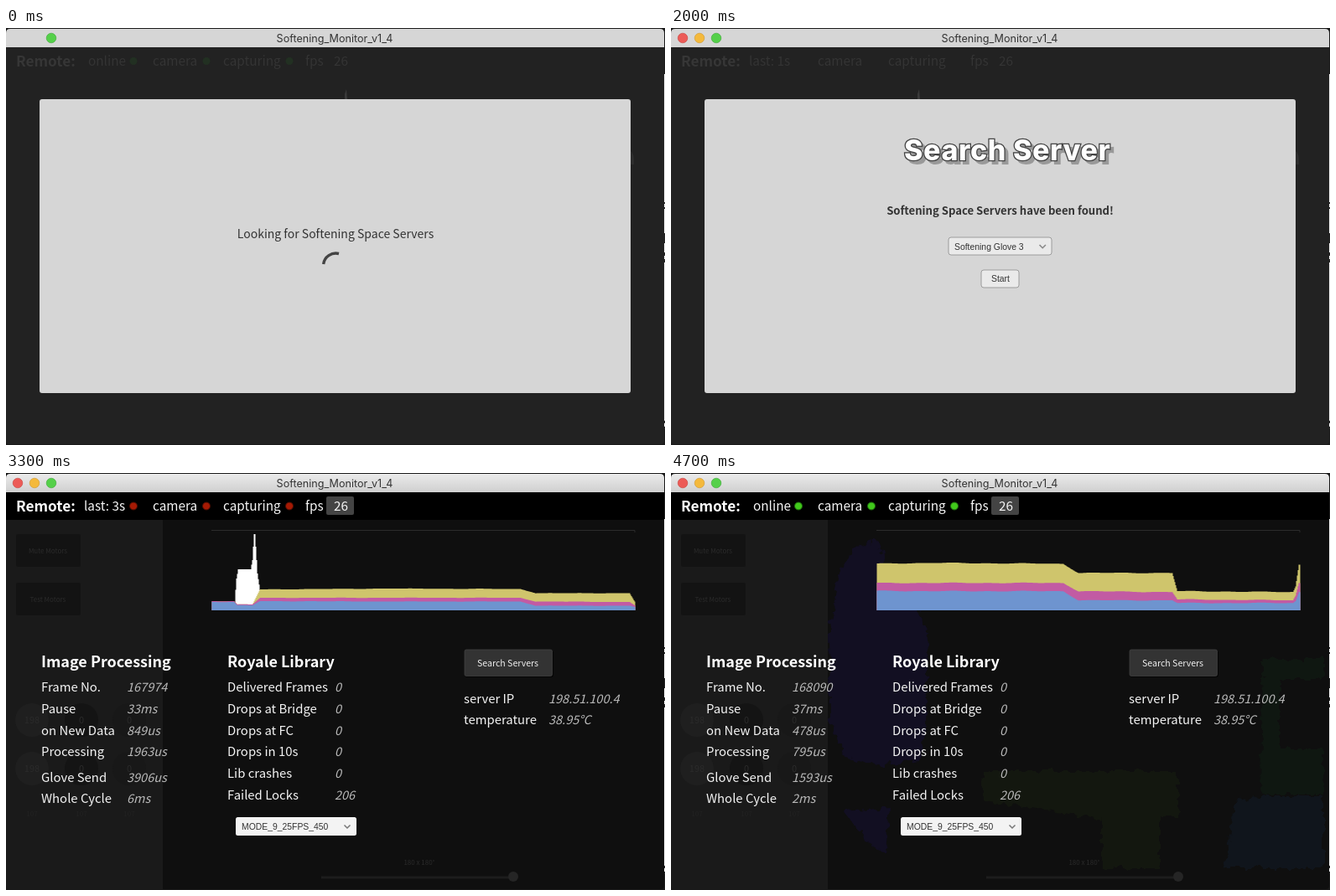
Recreate the animation shown at these times as an HTML page. Size 786x498 px, loop 4800 ms.

```html
<!DOCTYPE html>
<html lang="en">
<head>
<meta charset="utf-8">
<title>Server monitor</title>
<style>
  html, body { margin: 0; width: 100%; height: 100%; overflow: hidden; background: #111; }
  svg { display: block; width: 786px; height: 498px; }
  text { font-family: "Noto Sans CJK JP", "Noto Sans CJK SC", "Noto Sans CJK", "Noto Sans", sans-serif; font-size: 14.9px; white-space: pre; }
  .title { font: 12.6px Inter, sans-serif; fill: #333; }
  .control { font: 10.4px "Liberation Sans", Arial, sans-serif; fill: #333; }
  .status { font-size: 15.3px; }
  .head { font-size: 18px; font-weight: 700; fill: #fff; }
  .label { fill: #f4f4f4; }
  .value { font-size: 14.5px; font-style: italic; font-weight: 300; fill: #b9b9b9; }
  .banner { font: 800 34px Inter, sans-serif; letter-spacing: .6px; }
  .faint { font-size: 8px; text-anchor: middle; fill: #2b2b2b; }
</style>
</head>
<body>
<svg viewBox="0 0 786 498">
  <defs>
    <linearGradient id="bar" x2="0" y2="1">
      <stop stop-color="#ebebeb"/><stop offset="1" stop-color="#cfcfcf"/>
    </linearGradient>
    <filter id="rough" x="-5%" y="-5%" width="110%" height="110%" color-interpolation-filters="sRGB">
      <feTurbulence type="fractalNoise" baseFrequency=".12" numOctaves="2" seed="4"/>
      <feDisplacementMap in="SourceGraphic" scale="12" xChannelSelector="R" yChannelSelector="G"/>
    </filter>
  </defs>
  <rect width="786" height="498" fill="#1a1a1a"/>
  <path d="M785.5 55V478" stroke="#f2f2f2"/>
  <path d="M785.5 208v2m0 4v2m0 29v12m0 11v4m0 4v4m0 189v3m0 4v3" stroke="#222"/>
  <path id="body" d="M0 23H785V493q0 4-4 4H4q-4 0-4-4Z"/>
  <path id="titlebar" d="M0 23V6Q0 1 5 1H780q5 0 5 5V23Z"/>
  <g id="warm">
    <circle cx="14" cy="12" r="5.8" fill="#ec5b57" stroke="#c8403c" stroke-width=".6"/>
    <circle cx="34" cy="12" r="5.8" fill="#f4b93c" stroke="#cf962a" stroke-width=".6"/>
  </g>
  <circle cx="54" cy="12" r="5.8" fill="#55d04a" stroke="#3aa633" stroke-width=".6"/>
  <text class="title" x="392" y="17" text-anchor="middle">Softening_Monitor_v1_4</text>

  <g id="monitor">
    <path d="M0 56H187V497H4q-4 0-4-4Z" fill="#1a1a1a"/>
    <g id="depth" filter="url(#rough)">
      <path d="M216 90L246 80 258 112 284 136 306 190 304 306 296 342 250 350 208 340 190 300 189 190 200 120ZM206 404L260 400 256 454 232 440Z" fill="#120f22"/>
      <path d="M372 356H605V410H583V472H514V414L436 400 372 392Z" fill="#13170f"/>
      <path d="M706 222H778V246H726V330H778V384H704Z" fill="#0f1711"/>
      <path d="M672 392L706 386H778V472H660Z" fill="#10151c"/>
    </g>
    <g id="sidebar"></g>
    <path d="M376 483H600" stroke="#1d1d1d" stroke-width="3"/>
    <circle cx="605" cy="482" r="6" fill="#252525"/>
    <text class="faint" x="493" y="468">180 x 180°</text>
    <path d="M0 23H785V56H0Z" fill="#000"/>
    <path d="M245 68.5H750V71" fill="none" stroke="#2c2c2c"/>
    <g id="chart"></g>
    <g id="tables"></g>
    <rect x="547" y="212" width="106" height="32" rx="3" fill="#050505"/>
    <rect x="547" y="211" width="104.5" height="31.5" rx="2" fill="#333" stroke="#454545" stroke-width=".7"/>
    <text x="598.5" y="231" text-anchor="middle" fill="#eee" style="font-size:10.6px">Search Servers</text>
    <rect x="274" y="411" width="144" height="22" rx="2.5" fill="#f3f3f3"/>
    <text class="control" x="281" y="426">MODE_9_25FPS_450</text>
    <path d="M403.5 420.5l3.5 3.5 3.5-3.5" fill="none" stroke="#777" stroke-width="1.5"/>
  </g>

  <g id="header">
    <text id="remote" class="head" x="12" y="46" style="font-size:17.2px">Remote:</text>
    <text id="link" class="status" y="44.5"></text>
    <text class="status" x="175" y="44.5">camera</text>
    <text class="status" x="259" y="44.5">capturing</text>
    <text class="status" x="357" y="44.5">fps</text>
    <rect id="fpsBox" x="382" y="28" width="33" height="22" rx="2" fill="#444"/>
    <text id="fps" class="status" x="391" y="45"></text>
    <g id="lamps">
      <circle cx="152" cy="39.5" r="4.5"/><circle cx="239" cy="39.5" r="4.5"/><circle cx="338" cy="39.5" r="4.5"/>
    </g>
  </g>

  <g id="dialog">
    <path id="ghost" d="M-2 85V79L0 73 1 85Z" fill="#3a3a3a"/>
    <path d="M745 147q4 3 4 10v6h-4Z" fill="#2c2c2c"/>
    <rect x="40" y="85" width="705" height="351" rx="3" fill="#d6d6d6"/>
    <g id="searching">
      <text x="393" y="251" text-anchor="middle" fill="#333" style="font-size:14px;font-weight:500">Looking for Softening Space Servers</text>
      <path id="spinner" d="M378.6 282A15 15 0 0 1 397 269.5" fill="none" stroke="#444" stroke-width="3.4"/>
    </g>
    <g id="found">
      <g id="banner">
        <text class="banner" x="282" y="162" fill="#999" stroke="#999" stroke-width="2">Search Server</text>
        <text class="banner" x="278" y="158" fill="#fff" stroke="#444" stroke-width="2.6" paint-order="stroke">Search Server</text>
      </g>
      <text x="392.5" y="223" text-anchor="middle" fill="#333" style="font-size:13.1px;font-weight:700">Softening Space Servers have been found!</text>
      <rect id="choice" x="331" y="250" width="123" height="21" rx="3"/>
      <text class="control" x="338" y="265">Softening Glove 3</text>
      <path id="arrow" d="M439.5 259l3.7 3.7 3.7-3.7" fill="none" stroke-width="1.6"/>
      <rect id="start" x="370" y="289" width="45" height="21" rx="3"/>
      <text class="control" x="393" y="303" text-anchor="middle">Start</text>
    </g>
  </g>
</svg>
<script>
const LOOP = 4800, STEP = 100;
const FOUND = 900, CLOSING = 2700, MONITOR = 3300, ONLINE = 3700;
const $ = id => document.getElementById(id);
const show = (id, on) => $(id).style.display = on ? '' : 'none';
const set = (id, attrs) => { for (const k in attrs) $(id).setAttribute(k, attrs[k]); };
const mix = (a, b, p) => a + (b - a) * Math.min(1, Math.max(0, p));
const grey = v => `rgb(${[v, v, v].map(Math.round)})`;

// Static labels and value cells
const cell = (x, y, cls, str, id = '') => `<text x="${x}" y="${y}" class="${cls}" id="${id}">${str}</text>`;
const timingY = [261, 287, 313, 338, 369, 394];
const libraryY = [261, 287, 313, 338, 364, 390];
const timing = ['Frame No.', 'Pause', 'on New Data', 'Processing', 'Glove Send', 'Whole Cycle'];
const library = ['Delivered Frames', 'Drops at Bridge', 'Drops at FC', 'Drops in 10s', 'Lib crashes', 'Failed Locks'];
$('tables').innerHTML =
  cell(42, 232, 'head', 'Image Processing') + cell(264, 232, 'head', 'Royale Library') +
  timing.map((s, i) => cell(42, timingY[i], 'label', s) + cell(144, timingY[i], 'value', '', 'v' + i)).join('') +
  library.map((s, i) => cell(264, libraryY[i], 'label', s) + cell(392, libraryY[i], 'value', i === 5 ? 206 : 0)).join('') +
  cell(546, 275, 'label', 'server IP') + cell(647, 275, 'value', '198.51.100.4') +
  cell(546, 300, 'label', 'temperature') + cell(647, 300, 'value', '38.95°C');

const dials = [[31, 198, '#1f1f1f'], [90, 0, '#141414'], [147, 0, '#181818']];
$('sidebar').innerHTML = ['Mute Motors', 'Test Motors'].map((s, i) =>
  `<rect x="12" y="${73 + 58 * i}" width="77" height="39" rx="2" fill="#131313"/>
   <text class="faint" x="50" y="${96 + 58 * i}">${s}</text>`).join('') +
  [295, 353].map(y => dials.map(([x, n, fill]) =>
    `<circle cx="${x}" cy="${y}" r="20" fill="${fill}"/>
     <text class="faint" x="${x}" y="${y + 4}" style="font-size:11px">${n}</text>`).join('')).join('') +
  dials.map(([x]) => `<text class="faint" x="${x}" y="410" style="fill:#222">107</text>`).join('');

// Stacked history: position, then cumulative heights of the three lower layers
const history = [
  [200, 10, 11, 11], [256, 10, 11, 11], [260, 6, 7, 7], [278, 6, 7, 7], [287, 11, 15, 25],
  [440, 10.5, 15, 26], [598, 10.5, 15, 25.5], [616, 5.5, 10.5, 20.5], [728, 5.5, 10, 20.5],
  [734, 4, 6, 10.5], [872, 4, 5.5, 10], [875, 5, 8, 13], [879, 10, 15, 25], [900, 10, 15, 25]
];
const spike = [[257, 11], [259, 38], [261, 49], [276, 49], [278, 60], [279, 76], [280, 91], [281, 91], [282, 76], [284, 44], [287, 24]];

function sample(points, u, col) {
  const i = points.findIndex(p => p[0] >= u);
  if (i < 1) return 0;
  const [a, b] = [points[i - 1], points[i]];
  return mix(a[col], b[col], (u - a[0]) / (b[0] - a[0]));
}

// The history scrolls left and rescales once the peak has left the window
function drawChart(t) {
  const offset = Math.max(-16, Math.round((t - 3800) * .1444));
  const scale = offset > 36 ? 2.18 : 1;
  const area = height => {
    let d = 'M245.5 164';
    for (let x = 246; x <= 750; x++) d += `V${(164 - scale * height(x + offset)).toFixed(1)}H${x + .5}`;
    return d + 'V164Z';
  };
  const ripple = u => .25 * Math.sin(u / 9) * Math.sin(u / 23);
  const layer = (col, fill) => `<path fill="${fill}" d="${area(u => sample(history, u, col) + ripple(u))}"/>`;
  $('chart').innerHTML = `<path fill="#fff" d="${area(u => sample(spike, u, 1))}"/>` +
    layer(3, '#cfc56c') + layer(2, '#c25ba3') + layer(1, '#6e94cf');
}

function render(t) {
  const monitor = t >= MONITOR, online = t >= ONLINE || t < FOUND;
  const washed = t < FOUND || (t >= CLOSING && t < MONITOR);

  set('body', { fill: monitor ? '#0f0f0f' : '#222' });
  set('titlebar', { fill: monitor ? 'url(#bar)' : '#d6d6d6' });
  show('warm', !washed);
  show('monitor', monitor);
  show('dialog', !monitor);

  set('header', { fill: monitor ? '#f6f6f6' : '#343434' });
  $('remote').style.fill = monitor ? '#fff' : '#363636';
  $('link').textContent = online ? 'online' : `last: ${t < CLOSING ? 1 : 3}s`;
  set('link', { x: online ? 98 : 93 });
  $('fps').textContent = t >= ONLINE && t < 4000 ? 97 : 26;
  show('fpsBox', monitor);
  const lamp = monitor
    ? (online ? ['#41c81c', '#1c6a0c'] : ['#a51a04', '#4d0d02'])
    : t < FOUND ? ['#223022', 'none'] : ['#302222', 'none'];
  set('lamps', { fill: lamp[0], stroke: lamp[1], 'stroke-width': 1 });
  show('lamps', monitor || t < 600 || t >= CLOSING);

  if (monitor) {
    const p = (t - 3800) / 900;
    const values = online
      ? [168068 + Math.round(22 * p), '37ms', Math.round(mix(515, 478, p)) + 'us',
         Math.round(mix(809, 795, p)) + 'us', Math.round(mix(1587, 1593, p)) + 'us', '2ms']
      : [167974, '33ms', '849us', '1963us', '3906us', '6ms'];
    values.forEach((v, i) => $('v' + i).textContent = v);
    show('depth', online);
    drawChart(t);
    return;
  }

  show('searching', t < FOUND);
  show('found', t >= FOUND);
  show('banner', !washed);
  set('ghost', { transform: `translate(${t < FOUND ? 406 : 296} 0)` });
  set('spinner', { transform: `rotate(${t * .36} 393.5 284)` });
  const fade = (t - 1200) / 900;
  const button = plain => ({
    fill: washed ? plain : grey(mix(244, 233, fade)),
    stroke: washed ? 'none' : '#8c8c8c',
    'stroke-width': .8
  });
  set('choice', button('#e6e6e6'));
  set('start', button('#d6d6d6'));
  set('arrow', { stroke: washed ? '#c4c4c4' : grey(mix(110, 140, fade)) });
}

let last = -1;
const origin = performance.now();
function tick() {
  const t = Math.floor((performance.now() - origin) % LOOP / STEP) * STEP;
  if (t !== last) render(last = t);
  requestAnimationFrame(tick);
}
tick();
</script>
</body>
</html>
```
